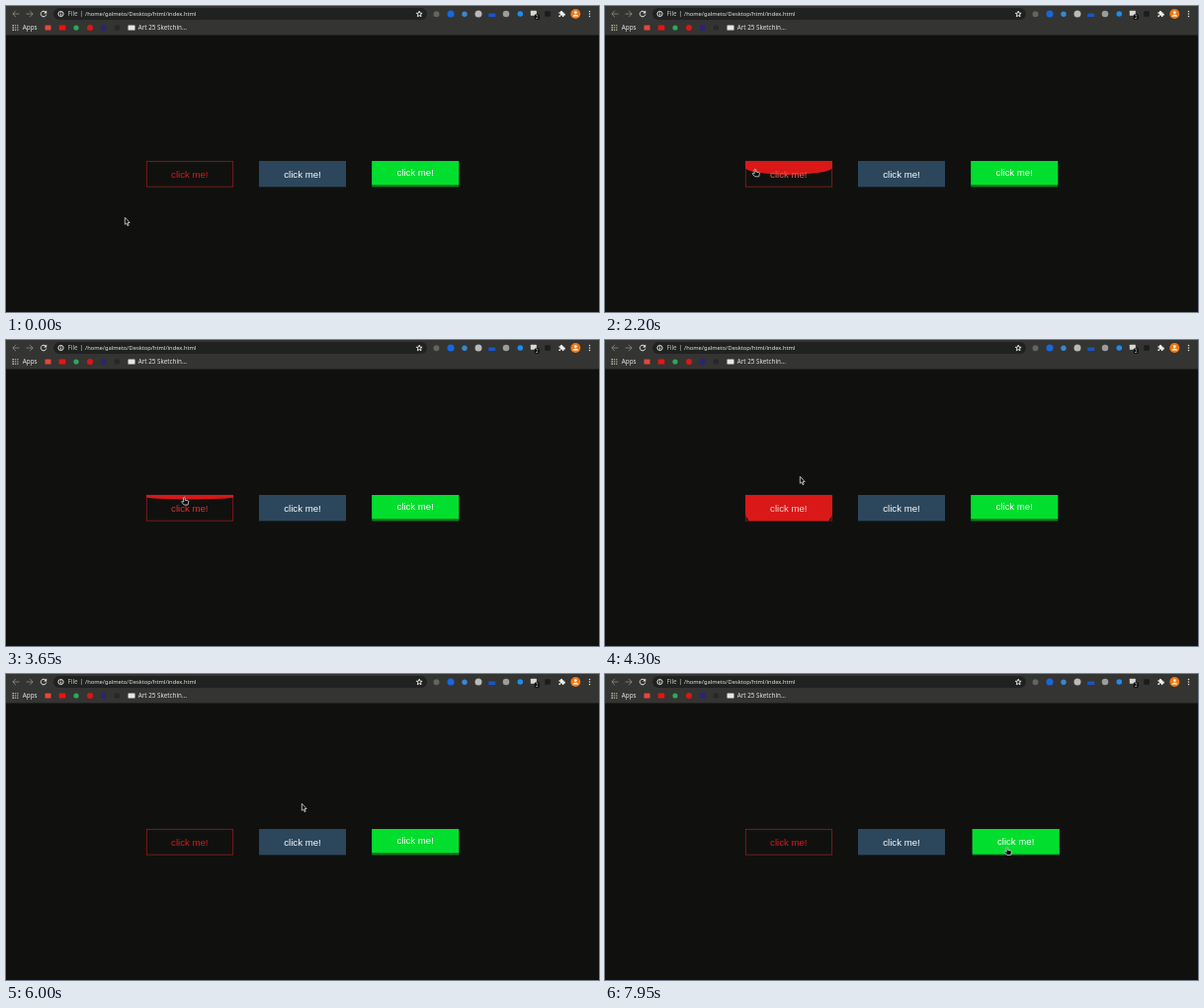
Write an HTML page that moves like this. It is 600x310 px and loops after 8000 ms.

```html
<!DOCTYPE html>
<html lang="en">
<head>
<meta charset="utf-8">
<title>Button hover effects</title>
<style>
  html, body { margin: 0; width: 100%; height: 100%; overflow: hidden; background: #10110f; }
  svg { display: block; width: 600px; height: 310px; }
  .ui { font-family: "Noto Sans", "Open Sans", sans-serif; font-size: 6.3px; fill: #e4e4e2; }
  .label { font-family: "Liberation Sans", Arial, sans-serif; font-size: 9.65px; text-anchor: middle; fill: #fff; }
  .line { fill: none; stroke: #e6e6e4; stroke-width: 1; }
</style>
</head>
<body>
<svg viewBox="0 0 600 310">
  <defs>
    <clipPath id="redBox"><rect x="142" y="157" width="88" height="26.3"/></clipPath>
    <clipPath id="blueBox"><rect x="256" y="157" width="88" height="26.3"/></clipPath>
  </defs>

  <rect width="600" height="310" fill="#10110f"/>
  <rect width="600" height="29.5" fill="#343432"/>

  <!-- toolbar -->
  <path class="line" d="M13.5 8H7M10 4.8L6.8 8L10 11.2" stroke-opacity=".38"/>
  <path class="line" d="M20.5 8H27M24 4.8L27.2 8L24 11.2" stroke-opacity=".38"/>
  <path class="line" d="M40.2 6.2A2.8 2.8 0 1 0 40.8 8.6"/>
  <path d="M41.2 4.4V7.4H38.2Z" fill="#e6e6e4"/>
  <rect x="48" y="2" width="378" height="12" rx="6" fill="#202221"/>
  <circle class="line" cx="55.5" cy="8" r="2.6" stroke-width=".7"/>
  <path class="line" d="M55.5 7.6V9.6M55.5 6.2V6.9" stroke-width=".7"/>
  <text class="ui" x="62.5" y="10.2" opacity=".8">File</text>
  <path class="line" d="M76.4 5V11" stroke-width=".6" stroke-opacity=".45"/>
  <text class="ui" x="80" y="10.2" style="font-size:5.75px">/home/galmeto/Desktop/html/index.html</text>
  <path class="line" d="M418.2 5.2L419 7.2L421.1 7.3L419.5 8.6L420 10.7L418.2 9.6L416.4 10.7L416.9 8.6L415.3 7.3L417.4 7.2Z" stroke-width=".6"/>
  <g id="tools"></g>
  <path d="M559.4 6.2H561A1.1 1.1 0 1 1 563 6.2H564.3V7.6A1.1 1.1 0 1 1 564.3 9.6V11H562.8A1 1 0 1 0 561 11H559.4V9.4A1 1 0 1 0 559.4 7.6Z" fill="#f1f1ef"/>
  <circle cx="576.3" cy="8" r="5" fill="#f07812"/>
  <circle cx="576.3" cy="6.6" r="1.4" fill="#fff"/>
  <path d="M573.5 10.6C573.5 8.1 579.1 8.1 579.1 10.6Z" fill="#fff"/>
  <g fill="#e6e6e4"><circle cx="590.5" cy="5.5" r=".75"/><circle cx="590.5" cy="8" r=".75"/><circle cx="590.5" cy="10.5" r=".75"/></g>
  <rect x="534.8" y="8.6" width="5" height="5.2" rx="1" fill="#0c0c0c"/>
  <text class="ui" x="536" y="13" style="font-size:4.6px">2</text>

  <!-- bookmarks -->
  <g id="marks"></g>
  <text class="ui" x="16.8" y="24.2">Apps</text>
  <text class="ui" x="133.8" y="24.2" style="font-size:6.25px">Art 25 Sketchin…</text>

  <!-- buttons -->
  <rect x="142.3" y="157.3" width="87.4" height="25.8" fill="none" stroke="#9c1c1b" stroke-width=".75"/>
  <path id="flood" fill="#d91817" clip-path="url(#redBox)"/>
  <text id="redText" class="label" x="185.8" y="173.5">click me!</text>

  <rect id="blue" x="256" y="157" width="88" height="26.3"/>
  <g clip-path="url(#blueBox)"><path id="sheen" fill="#fff"/></g>
  <text class="label" x="300" y="173.5">click me!</text>

  <g id="green">
    <rect x="370.2" y="157" width="88" height="26.4" fill="#067d1c"/>
    <rect id="face" x="370.2" y="157" width="88" fill="#02de2e"/>
    <text id="greenText" class="label" x="414.2">click me!</text>
  </g>

  <!-- pointers -->
  <g id="cursor" stroke="#f4f4f2" fill="#080808" stroke-linejoin="round">
    <path id="arrow" d="M.3 .3V7.3L1.9 5.9L3 8.6L4.2 8.1L3.1 5.5H5.2Z" stroke-width=".7"/>
    <path id="hand" d="M-.8 .6Q0 -.5 .7 .6V3L3.6 3.5Q4.5 3.7 4.4 4.7L3.7 7.8H-.3L-2.8 4.9Q-2.6 3.7 -1.5 4.3L-.8 4.9Z" stroke-width=".7"/>
  </g>
</svg>
<script>
const LOOP = 8000, STEP = 50;
const $ = id => document.getElementById(id);

// time, x, y of the pointer's tip
const path = [
  [0, 120, 214], [1100, 120, 214], [1700, 124, 172], [2100, 142, 167], [2200, 152, 165],
  [2500, 175, 164], [2850, 172, 166], [3010, 160, 157], [3100, 155, 125], [3300, 160, 118],
  [3600, 178, 157], [3850, 190, 168], [4100, 196, 168], [4220, 197, 157], [4300, 197, 138],
  [4550, 225, 128], [4970, 282, 157], [5150, 288, 176.5], [5400, 292, 170], [5600, 296, 157],
  [5800, 300, 132], [6200, 298, 130], [6465, 296, 157], [6750, 296, 165], [6950, 300, 183],
  [7200, 330, 223], [7400, 370, 213], [7600, 396, 183], [7700, 402, 178], [8000, 408, 175]
];

// enter and leave times for each button
const hover = {
  red: [[2100, 3010], [3600, 4220]],
  blue: [[4970, 5600], [6465, 6950]],
  green: [[7600, 9000]]
};

const clamp = v => Math.max(0, Math.min(1, v));
const mix = (a, b, k) => a + (b - a) * k;
const blend = (a, b, k) => `rgb(${a.map((v, i) => Math.round(mix(v, b[i], k)))})`;

// cubic-bezier(.25, .1, .25, 1)
function ease(x) {
  if (x <= 0 || x >= 1) return clamp(x);
  let lo = 0, hi = 1;
  const curve = (p, q, u) => 3 * p * u * (1 - u) ** 2 + 3 * q * u * u * (1 - u) + u ** 3;
  for (let i = 0; i < 20; i++) {
    const mid = (lo + hi) / 2;
    if (curve(.25, .25, mid) < x) lo = mid; else hi = mid;
  }
  return curve(.1, 1, lo);
}

const level = (spans, t, dur) => clamp(spans.reduce(
  (sum, [a, b]) => sum + ease((t - a) / dur) - ease((t - b) / dur), 0));

function pointer(t) {
  const i = path.findIndex(p => p[0] > t);
  const [t0, x0, y0] = path[i - 1], [t1, x1, y1] = path[i];
  const k = (t - t0) / (t1 - t0);
  return [mix(x0, x1, k), mix(y0, y1, k)];
}

function draw(t) {
  const red = level(hover.red, t, 500);
  const h = 47 * red, r = h / 2;
  $("flood").setAttribute("d",
    `M142 157H230V${157 + r}A44 ${r} 0 0 1 142 ${157 + r}Z`);
  $("flood").style.display = red > 0 ? "" : "none";
  $("redText").style.fill = blend([212, 27, 26], [255, 255, 255], red);

  const blue = level(hover.blue, t, 500);
  $("blue").style.fill = blend([44, 71, 92], [37, 57, 79], clamp(blue * 2));
  const x = mix(230, 350, blue);
  const lean = Math.max(0, 14 + (x - 304) * .23);
  $("sheen").setAttribute("d", `M${x} 183.3L${x + lean} 157h22L${x + 22} 183.3Z`);
  $("sheen").style.opacity = clamp(.68 + (x - 304) * .0065);

  const green = level(hover.green, t, 300);
  $("green").setAttribute("transform", `translate(${1.5 * green} 0)`);
  $("face").setAttribute("height", mix(24.1, 25.5, green));
  $("greenText").setAttribute("y", mix(172.2, 173.1, green));

  const over = Object.values(hover).flat().some(([a, b]) => t >= a && t < b);
  $("arrow").style.display = over ? "none" : "";
  $("hand").style.display = over ? "" : "none";
  $("cursor").setAttribute("transform", `translate(${pointer(t)})`);
}

// plain icons: x, y, width, height, colour, corner radius
const icons = list => list.map(([x, y, w, h, c, r = .5]) =>
  `<rect x="${x - w / 2}" y="${y - h / 2}" width="${w}" height="${h}" rx="${r}" fill="${c}"/>`).join("");

$("tools").innerHTML = icons([
  [435.5, 8.3, 6, 6, "#62645f", 3], [450, 8, 7, 7, "#1767e0", 3.5],
  [464, 8.3, 5.4, 5.4, "#3c86cc", 2.7], [478, 8, 7, 7, "#b9bab8", 3.5],
  [491.7, 9.2, 7, 3.6, "#1a55c4"], [506, 8, 6.6, 6.6, "#9c9d9b", 3.3],
  [520.3, 8, 5.6, 5.6, "#1c8df0", 2.8], [533.8, 7.2, 6, 5, "#d8d8d6"],
  [548, 8, 5.6, 5.6, "#1b1c1b", 1]
]);

const grid = [];
for (let i = 0; i < 9; i++) {
  grid.push([7.2 + i % 3 * 2.3, 19.6 + Math.floor(i / 3) * 2.3, 1.4, 1.4, ["#d8d8d5", "#b7a17e", "#a3a5a2"][i % 3], .3]);
}
$("marks").innerHTML = icons([...grid,
  [42.5, 22, 6, 5, "#e5473b"], [57, 22, 6.6, 5, "#e81414"],
  [71, 22, 5.2, 5.2, "#2fa75a", 2.6], [85, 22, 6, 6, "#dd1616", 3],
  [98.6, 22, 5, 6.2, "#282672"], [112.3, 22, 5.6, 5.6, "#272827", 2.8],
  [127, 22, 7, 5, "#e6e6e4"]
]);

const start = performance.now();
function tick() {
  const t = Math.max(0, performance.now() - start) % LOOP;
  draw(Math.floor(t / STEP) * STEP);
  requestAnimationFrame(tick);
}
tick();
</script>
</body>
</html>
```
